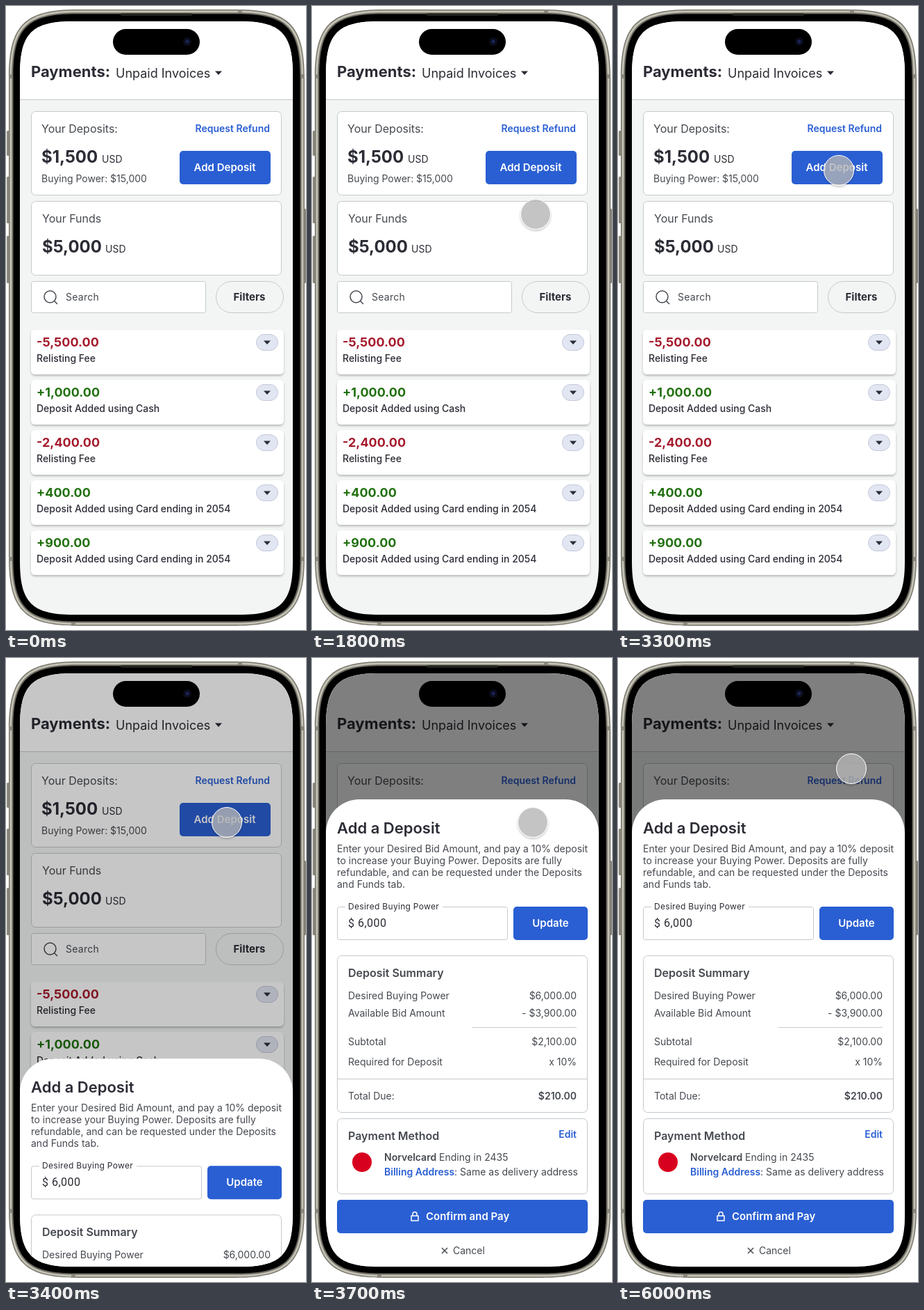
Recreate the animation shown at these times as an HTML page. Size 432x896 px, loop 8000 ms.

```html
<!DOCTYPE html>
<html lang="en">
<head>
<meta charset="utf-8">
<title>Add a deposit</title>
<style>
  html, body { margin: 0; width: 100%; height: 100%; overflow: hidden; background: #fff; }
  svg { display: block; width: 432px; height: 896px; }
  text { font-family: Inter, sans-serif; font-size: 14px; fill: #45494f; white-space: pre; }
  .b { font-weight: 600; }
  .bold { font-weight: 700; }
  .dark { fill: #2b2c35; }
  .label { fill: #2b2c35; font-weight: 500; }
  .link { fill: #2a5fd3; font-weight: 600; }
  .light { fill: #fff; font-weight: 600; font-size: 15px; }
  .card { fill: #fff; stroke: #c5c9cc; }
  .line { stroke: #c5c9cc; }
  .button { fill: #2a5fd3; }
  .icon { fill: none; stroke-width: 1.5; }
</style>
</head>
<body>
<svg viewBox="0 0 432 896">
  <defs>
    <clipPath id="screen"></clipPath>
    <filter id="soft" x="-20%" y="-20%" width="140%" height="150%">
      <feDropShadow dx="0" dy="2" stdDeviation="1.5" flood-opacity=".25"/>
    </filter>
  </defs>
  <g id="phone"></g>
  <g clip-path="url(#screen)">
    <g id="page"></g>
    <rect id="dim" width="432" height="896"/>
    <g id="sheet"></g>
  </g>
  <rect x="154" y="33" width="125" height="37" rx="18.5"/>
  <circle cx="261" cy="51" r="6" fill="#0b0d1c"/>
  <circle cx="261" cy="51" r="2.5" fill="#1b2458"/>
  <circle id="cursor" r="21.5" fill="#b9b9b9" fill-opacity=".74" stroke="#fff" filter="url(#soft)"/>
</svg>
<script>
const $ = id => document.getElementById(id);
const rect = (x, y, w, h, rx, attrs) =>
  `<rect x="${x}" y="${y}" width="${w}" height="${h}" rx="${rx}" ${attrs}/>`;
const fill = color => `fill="${color}"`;
const card = (x, y, w, h, r = 6) => rect(x + .5, y + .5, w - 1, h - 1, r, 'class="card"');
const button = (x, y, w, h) => rect(x, y, w, h, 5, 'class="button"');
const text = (x, y, str, cls = '', size = 14, anchor = 'start', extra = '') =>
  `<text x="${x}" y="${y}" class="${cls}" text-anchor="${anchor}" style="font-size:${size}px;${extra}">${str}</text>`;
const rule = (x1, x2, y) => `<path d="M${x1} ${y}.5H${x2}" class="line"/>`;
const caret = (x, y) => `<path d="M${x - 5} ${y - 2.5}h10l-5 5.5z" fill="#2b2c35"/>`;

// Rectangle with continuous corners: the curve starts early and tightens at the middle.
function smooth(x, y, w, h, r, color = '#000') {
  const e = 1.4 * r, k = e - .314 * r, s = e - k;
  return `<path fill="${color}" d="M${x} ${y + e}v${h - 2 * e}c0 ${k} ${s} ${e} ${e} ${e}` +
    `h${w - 2 * e}c${k} 0 ${e} ${-s} ${e} ${-e}v${2 * e - h}c0 ${-k} ${-s} ${-e} ${-e} ${-e}` +
    `h${2 * e - w}c${-k} 0 ${-e} ${s} ${-e} ${e}z"/>`;
}

function phone() {
  const side = (x, y, h) => rect(x, y, 4, h, 1.5, fill('#8b897d'));
  const band = (x, y, w, h) => rect(x, y, w, h, 0, fill('#8a887d'));
  return side(1, 179, 36) + side(1, 245, 67) + side(1, 330, 68) + side(428, 291, 107) +
    smooth(4, 5, 426, 885, 71, '#77756a') +
    smooth(5.5, 6.5, 423, 882, 69.5, '#c3c1b4') +
    smooth(8.5, 9.5, 417, 876, 66.5, '#6c6a61') +
    band(4, 98, 5, 6) + band(425, 98, 5, 6) + band(4, 791, 5, 6) + band(425, 791, 5, 6) +
    band(334, 5, 6, 5) + band(94, 885, 6, 5) +
    smooth(10.5, 11.5, 413, 872, 64.5) +
    rect(165, 10.5, 103, 3.5, 1.7, fill('#24241f'));
}

function page() {
  const entries = [
    ['-5,500.00', 'Relisting Fee'],
    ['+1,000.00', 'Deposit Added using Cash'],
    ['-2,400.00', 'Relisting Fee'],
    ['+400.00', 'Deposit Added using Card ending in 2054'],
    ['+900.00', 'Deposit Added using Card ending in 2054'],
  ];
  const entry = ([amount, label], i) => {
    const y = 465 + 72 * i, color = amount[0] === '-' ? '#a51a2c' : '#20700e';
    return rect(36, y, 364, 64, 6, 'fill="#fff" filter="url(#soft)"') +
      text(44, y + 24, amount, 'bold', 18, 'start', `fill:${color}`) +
      text(44, y + 46, label, 'label') +
      rect(360.5, y + 6.5, 31, 23, 11.5, 'fill="#e2e6f2" stroke="#c3c8da"') +
      caret(376, y + 18);
  };
  return rect(0, 0, 432, 896, 0, fill('#f3f5f5')) +
    rect(0, 0, 432, 134, 0, fill('#fff')) + rule(0, 432, 134) +
    text(36, 102, 'Payments:', 'bold dark', 22) +
    text(158, 103, 'Unpaid Invoices', 'dark', 18) + caret(306, 96) +

    card(36, 151, 361, 121) +
    text(51, 182, 'Your Deposits:', '', 16) +
    text(380, 181, 'Request Refund', 'link', 14, 'end') +
    text(51, 225, '$1,500', 'bold dark', 24) + text(138, 225, 'USD', 'dark') +
    text(51, 253, 'Buying Power: $15,000') +
    button(250, 208, 131, 48) + text(315, 237, 'Add Deposit', 'light', 15, 'middle') +

    card(36, 280, 361, 107) +
    text(52, 311, 'Your Funds', '', 16) +
    text(52, 354, '$5,000', 'bold dark', 24) + text(143, 354, 'USD', 'dark') +

    card(36, 395, 252, 46, 3) +
    '<path d="M69.500 423.500l4.500 4.500M72 417.500a8.500 8.500 0 1 0-17 0a8.500 8.500 0 1 0 17 0" class="icon" stroke="#45494f"/>' +
    text(86, 423, 'Search', '', 14, 'start', 'letter-spacing:.25px') +
    rect(302.5, 395.5, 97, 45, 22.5, 'fill="#f3f5f5" stroke="#c5c9cc"') +
    text(350.5, 423, 'Filters', 'bold dark', 15, 'middle') +
    entries.map(entry).join('');
}

function sheet() {
  const intro = [
    'Enter your Desired Bid Amount, and pay a 10% deposit',
    'to increase your Buying Power. Deposits are fully',
    'refundable, and can be requested under the Deposits',
    'and Funds tab.',
  ];
  const rows = [
    [490, 'Desired Buying Power', '$6,000.00'],
    [515, 'Available Bid Amount', '- $3,900.00'],
    [556, 'Subtotal', '$2,100.00'],
    [585, 'Required for Deposit', 'x 10%'],
    [634, 'Total Due:', '$210.00', 'b'],
  ];
  return rect(20, 203, 393, 760, 48, fill('#fff')) +
    text(36, 252, 'Add a Deposit', 'b dark', 22) +
    intro.map((line, i) => text(36, 279 + 17 * i, line)).join('') +

    card(36, 357, 246, 48, 3) + rect(48, 355, 140, 5, 0, fill('#fff')) +
    text(52, 361, 'Desired Buying Power', 'dark', 12, 'start', 'letter-spacing:.3px') +
    text(52, 386, '$ 6,000', 'dark', 16, 'start', 'font-family:Roboto,sans-serif;letter-spacing:.5px') +
    button(290, 357, 107, 48) + text(343.5, 386, 'Update', 'light', 15, 'middle') +

    card(36, 427, 361, 226) +
    text(52, 458, 'Deposit Summary', 'b', 16) +
    rows.map(([y, label, value, cls]) =>
      text(52, y, label) + text(381, y, value, cls, 14, 'end')).join('') +
    rule(231, 381, 530) + rule(36, 397, 604) +

    card(36, 661, 361, 109) +
    text(52, 692, 'Payment Method', 'b', 16) +
    text(381, 689, 'Edit', 'link', 14, 'end') +
    '<circle cx="72" cy="724" r="14" fill="#d8001f"/>' +
    text(104, 722, '<tspan class="b">Norvelcard</tspan> Ending in 2435') +
    text(104, 743, '<tspan class="link">Billing Address</tspan>: Same as delivery address') +

    button(36, 778, 361, 48) +
    '<path d="M145 801v-2.500a3 3 0 0 1 6 0v2.500M143 801h10v7h-10z" class="icon" stroke="#fff" stroke-linejoin="round"/>' +
    text(164, 807, 'Confirm and Pay', 'light', 15) +
    '<path d="M187 847l8 8M195 847l-8 8" class="icon" stroke="#45494f"/>' +
    text(203, 856, 'Cancel');
}

$('screen').innerHTML = smooth(20, 22, 393, 852, 55);
$('phone').innerHTML = phone();
$('page').innerHTML = page();
$('sheet').innerHTML = sheet();

// cubic-bezier(0, 0, .58, 1) over 300 ms
function easeOut(now, start) {
  const t = Math.min(1, Math.max(0, (now - start) / 300));
  let lo = 0, hi = 1;
  for (let i = 0; i < 20; i++) {
    const u = (lo + hi) / 2;
    if (1.74 * u * u - .74 * u ** 3 < t) lo = u; else hi = u;
  }
  return t === 0 || t === 1 ? t : 3 * lo * lo - 2 * lo ** 3;
}

function draw() {
  const now = performance.now() % 8000;
  const appear = easeOut(now, 1411), press = easeOut(now, 2711);
  const open = easeOut(now, 3311), leave = easeOut(now, 3911);
  $('cursor').setAttribute('opacity', appear);
  $('cursor').setAttribute('transform',
    `translate(${322 - 4 * press + 18 * leave} ${299 - 63 * press - 77 * leave})`);
  $('dim').setAttribute('opacity', open / 2);
  $('sheet').setAttribute('transform', `translate(0 ${671 * (1 - open)})`);
  requestAnimationFrame(draw);
}
draw();
</script>
</body>
</html>
```
